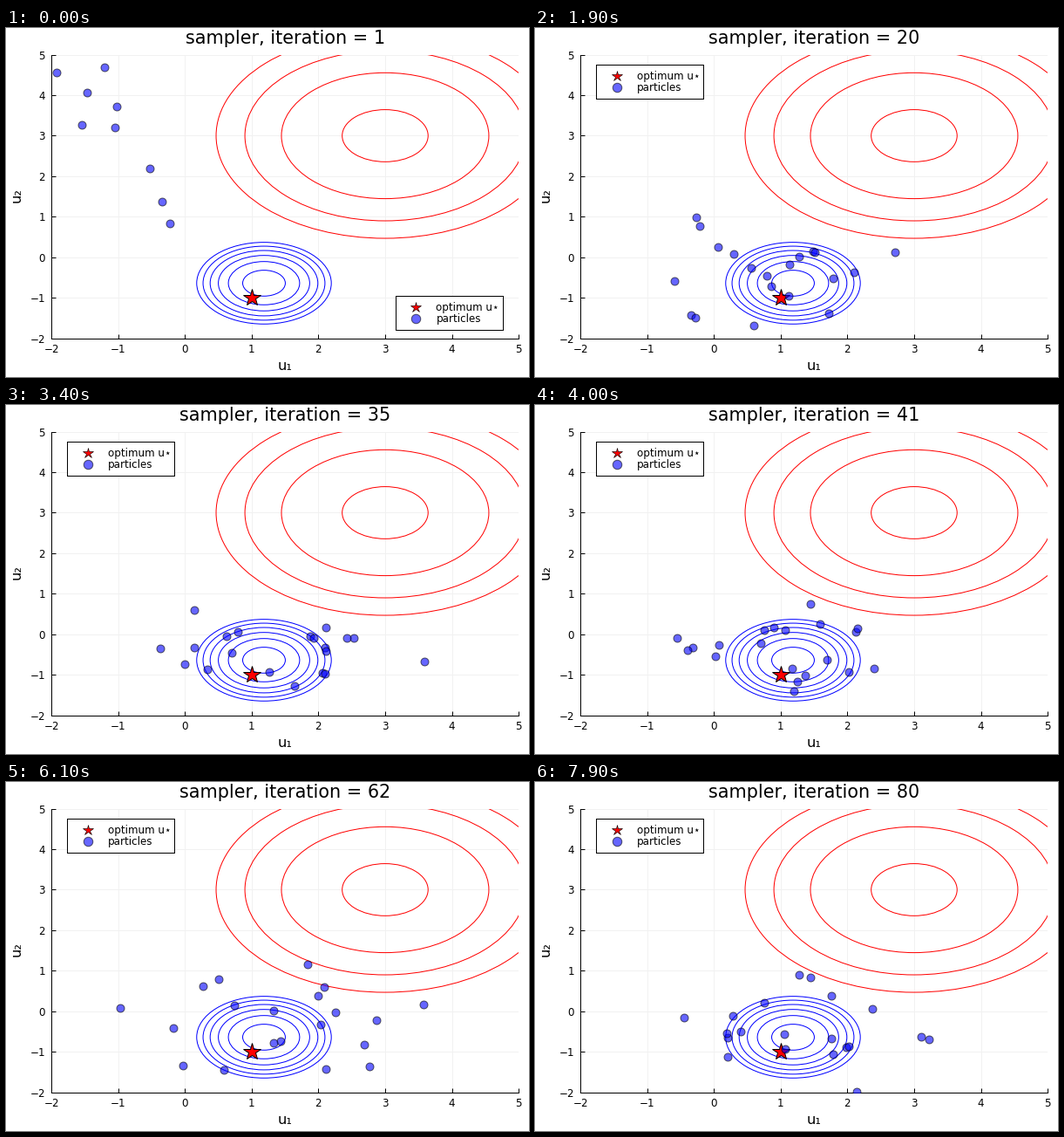
Animation, 600 px wide and 400 px high, one loop 8 s. Source, as a matplotlib script:

```python
import numpy as np
import matplotlib.pyplot as plt
from matplotlib.animation import FuncAnimation
from matplotlib.patches import Circle

W, H, DPI = 600, 400, 100
PX = 72 / DPI  # points per pixel
FRAMES, COUNT = 80, 20

plt.rcParams["font.family"] = "DejaVu Sans"
fig = plt.figure(figsize=(W / DPI, H / DPI), dpi=DPI, facecolor="white")


def box(x, y, w, h):
    """Pixel box with a top-left origin, in figure fractions."""
    return [x / W, 1 - (y + h) / H, w / W, h / H]


def label(x, y, text, size, **kw):
    return fig.text(x / W, 1 - y / H, text, fontsize=size * PX, color="black", **kw)


def particle_paths():
    """Start along a falling diagonal, then relax into a jittering cloud."""
    rng = np.random.default_rng(7)
    seen = [(-1.92, 4.57), (-1.20, 4.69), (-1.47, 4.06), (-1.55, 3.27), (-1.02, 3.72),
            (-1.05, 3.21), (-0.53, 2.19), (-0.34, 1.38), (-0.23, 0.83)]
    far_x = rng.uniform(-3.6, -2.3, COUNT - len(seen))
    start = np.vstack([seen, np.column_stack([far_x, 0.6 - 2.2 * far_x])])

    mean, spread, keep = np.array([1.2, -0.3]), np.array([0.95, 0.65]), 0.7
    kick = spread * np.sqrt(3 * (1 - keep ** 2))  # uniform noise of matching variance
    offset, paths = start - mean, [start]
    for _ in range(FRAMES - 1):
        offset = keep * offset + kick * rng.uniform(-1, 1, (COUNT, 2))
        paths.append(mean + offset)
    return np.array(paths)


paths = particle_paths()

# Plot area
LEFT, TOP, PW, PH = 52.1, 30.6, 536, 325
ax = fig.add_axes(box(LEFT, TOP, PW, PH))
ax.set(xlim=(-2, 5), ylim=(-2, 5))
ax.spines[["top", "right"]].set_visible(False)
ax.spines[["left", "bottom"]].set_linewidth(PX)
ticks = range(-2, 6)
ax.set_xticks(ticks, [])
ax.set_yticks(ticks, [])
ax.tick_params(direction="in", length=5 * PX, width=PX)
ax.grid(color="0.945", linewidth=PX)
ax.set_axisbelow(True)

for v in ticks:
    text = str(v).replace("-", "\u2212")
    label(LEFT + (v + 2) * PW / 7, 371.5, text, 11.9, ha="center", va="baseline")
    label(45, TOP + (5 - v) * PH / 7, text, 11.9, ha="right", va="center_baseline")

label(320.5, 392, "u\u2081", 16.3, ha="center", va="baseline")
label(19.5, 192, "u\u2082", 16.3, rotation=90, ha="right", va="center")
title = label(320.5, 18, "", 20.8, ha="center", va="baseline")


def rings(center, color, squared_radii):
    for r2 in squared_radii:
        ax.add_patch(Circle(center, r2 ** 0.5, fill=False, ec=color, lw=PX, zorder=2))


rings((3, 3), "red", 0.414 + 2 * np.arange(4))
rings((1.185, -0.64), "blue", 0.102 + 0.183 * np.arange(6))


def star(axes, x, y, size, edge):
    axes.plot(x, y, "*", ms=size * PX, mfc="red", mec="black", mew=edge * PX, zorder=3)


def dots(axes, x, y, size):
    return axes.plot(x, y, "o", ms=size * PX, mfc=(0, 0, 1, 0.6),
                     mec=(0, 0, 0, 0.6), mew=PX, zorder=4)[0]


star(ax, 1, -1, 21, 1)
particles = dots(ax, [], [], 9)

# Legend, a small panel that changes corners once the cloud arrives
LW, LH = 123.2, 39
EARLY, LATE = (446.7, 306.6), (70.2, 41.7)
legend = fig.add_axes(box(*EARLY, LW, LH), zorder=5)
legend.set(xlim=(0, LW), ylim=(LH, 0), xticks=[], yticks=[])
for side in legend.spines.values():
    side.set_linewidth(PX)
star(legend, 23.6, 13, 12.5, 0.6)
dots(legend, 23.6, 26, 10.5)
for y, text in ((17.3, "optimum u\u22c6"), (30.3, "particles")):
    legend.text(46.7, y, text, fontsize=11.9 * PX, va="baseline")


def draw(i):
    title.set_text(f"sampler, iteration = {i + 1}")
    particles.set_data(paths[i, :, 0], paths[i, :, 1])
    legend.set_position(box(*(EARLY if i < 3 else LATE), LW, LH))
    return title, particles, legend


anim = FuncAnimation(fig, draw, frames=FRAMES, interval=100, repeat=True, blit=False)
plt.show()
```
